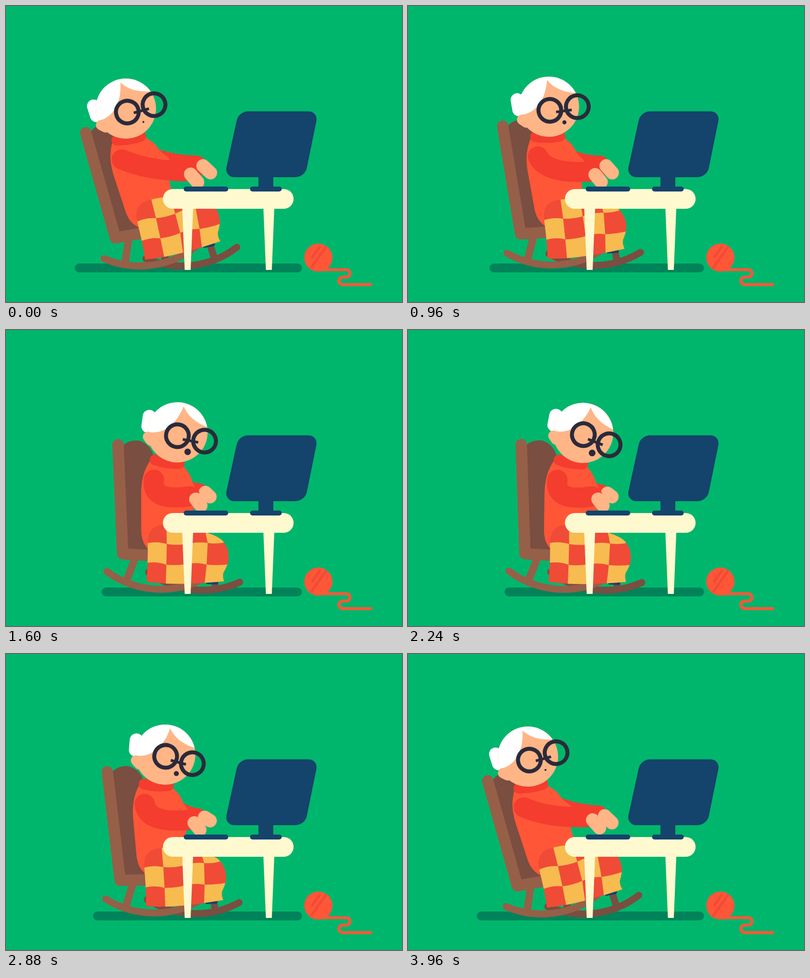
Animation, 800 px wide and 600 px high, one loop 4 s. Source, as an HTML page with a canvas:

```html
<!DOCTYPE html>
<html lang="en">
<head>
<meta charset="utf-8">
<title>Granny at the computer</title>
<style>
html, body { margin: 0; height: 100%; overflow: hidden; background: #00b66c; }
canvas { display: block; }
</style>
</head>
<body>
<canvas id="stage" width="800" height="600"></canvas>
<script>
const ctx = document.getElementById('stage').getContext('2d');
const LOOP = 4000, STEP = 40;
const color = {
  ground: '#00b66c', shadow: '#00835a', skin: '#ffb586', ink: '#2b2a3a',
  sweater: '#ff5638', sleeve: '#f43d2e', wood: '#965f48', darkWood: '#7a4e40',
  cream: '#fff9d0', navy: '#14436b', yellow: '#f7bb50', red: '#f04b37'
};

// Pivots in the leaning-back pose
const NEAR = [297.5, 525], FAR = [375, 525], HIP = [263, 477], NECK = [270, 266];

// Blanket grid, four lines of five knots
const GRID = [
  [[250, 400], [293, 390], [330, 380], [372, 385], [420, 385]],
  [[265, 437], [303, 430], [342, 421], [383, 409], [416, 400]],
  [[274, 476], [312, 471], [352, 460], [391, 452], [440, 439]],
  [[281, 516], [320, 511], [358, 503], [396, 491], [440, 478]]
];

// Cubic bezier (.6, 0, .4, 1), solved by bisection
function ease(x) {
  let lo = 0, hi = 1;
  for (let i = 0; i < 24; i++) {
    const s = (lo + hi) / 2, r = 1 - s;
    if (1.8 * s * r * r + 1.2 * s * s * r + s * s * s < x) lo = s; else hi = s;
  }
  return lo * lo * (3 - 2 * lo);
}
const ramp = (t, from, to) => ease(Math.min(1, Math.max(0, (t - from) / (to - from))));
const rock = t => ease(1 - Math.abs(((t + LOOP) % LOOP) / 2000 - 1));
const rad = deg => deg * Math.PI / 180;

function turn([x, y], [cx, cy], deg) {
  const c = Math.cos(rad(deg)), s = Math.sin(rad(deg));
  return [cx + (x - cx) * c - (y - cy) * s, cy + (x - cx) * s + (y - cy) * c];
}

function group(pivot, deg, draw) {
  ctx.save();
  ctx.translate(...pivot);
  ctx.rotate(rad(deg));
  ctx.translate(-pivot[0], -pivot[1]);
  draw();
  ctx.restore();
}

function fill(d, c) {
  ctx.fillStyle = c;
  ctx.fill(new Path2D(d));
}
function stroke(d, c, width, cap = 'round') {
  ctx.strokeStyle = c;
  ctx.lineWidth = width;
  ctx.lineCap = cap;
  ctx.lineJoin = 'round';
  ctx.stroke(new Path2D(d));
}
function disc(x, y, r, c) {
  ctx.fillStyle = c;
  ctx.beginPath();
  ctx.arc(x, y, r, 0, 7);
  ctx.fill();
}
const line = (a, b, c, width) => stroke(`M${a}L${b}`, c, width);
const curve = (a, mid, b, c, width) => stroke(`M${a}Q${mid} ${b}`, c, width);
const midpoint = (a, b, drop) => [(a[0] + b[0]) / 2, (a[1] + b[1]) / 2 + drop];

const rocker = (x, c) =>
  stroke(`M${x - 72.6} 512A183 183 0 0 0 ${x + 111.4} 489`, c, 14);

function farChair() {
  stroke('M326 480L320 518M410 476L421 512', color.darkWood, 14);
  rocker(355, color.darkWood);
}

function nearChair() {
  line([401, 486], [418, 483], color.navy, 8);
  fill('M170 258Q177 243 199 239Q227 240 238 268L290 445L225 462Z', color.darkWood);
  stroke('M161 257L221 470L300 456', color.wood, 23);
  stroke('M247.5 472L241 520', color.wood, 15);
  rocker(270.6, color.wood);
}

function torso() {
  fill('M216 272C209 295 209 315 218 345L240 412Q249 443 272 450L330 440L338 400' +
    'Q336 375 328 350L331 314Q330 306 318 300L310 292Q300 275 280 266Z', color.sweater);
  curve([224, 272], [250, 272], [272, 264], color.sleeve, 22);
}

function blanket() {
  ctx.save();
  ctx.clip(new Path2D('M265 437Q258 408 279 397Q300 388 340 386L376 389' +
    'Q405 391 414 400Q430 413 432 435Q432 447 428 459Q427 467 433 477' +
    'Q395 490 357 500Q320 510 281 514Q275 475 265 437Z'));
  fill('M240 370H450V530H240Z', color.red);
  for (let i = 0; i < 3; i++) {
    for (let j = 0; j < 4; j++) {
      if ((i + j) % 2 === 0) continue;
      const [a, b] = GRID[i].slice(j, j + 2), [d, c] = GRID[i + 1].slice(j, j + 2);
      const sag = j % 2 ? 3 : -5;
      fill(`M${a}Q${midpoint(a, b, sag)} ${b}L${c}Q${midpoint(c, d, sag)} ${d}Z`, color.yellow);
    }
  }
  ctx.restore();
}

function head(mouth, tilt) {
  line([177, 203], [183, 222], '#fff', 27);
  disc(242, 208, 61, color.skin);
  ctx.save();
  ctx.beginPath();
  ctx.arc(242, 208, 61, 0, 7);
  ctx.clip();
  fill('M231 155C233 190 222 222 190 232L170 236V130H310L300 172Q256 178 231 155Z', '#fff');
  ctx.restore();
  line([192, 241.5], [201, 246], color.skin, 21);
  disc(277.5, 235, mouth, color.ink);

  ctx.save();
  ctx.translate(272, 207.5);
  ctx.rotate(rad(tilt - 15.5));
  stroke('M-51 0a23 23 0 1 0 46 0a23 23 0 1 0 -46 0M5 0a23 23 0 1 0 46 0a23 23 0 1 0 -46 0', color.ink, 8);
  stroke('M-16 5H16', color.ink, 5.5, 'butt');
  ctx.restore();
}

function desk() {
  fill('M356 410H378L373 535H361ZM520 410H542L537 535H525Z', color.cream);
  line([337, 391], [561, 391], color.cream, 40);
  fill('M510 340H540V370H510Z', color.navy);
  line([364, 371], [444, 371], color.navy, 10);
  line([498, 371], [552, 371], color.navy, 10);
  ctx.fillStyle = color.navy;
  ctx.beginPath();
  ctx.moveTo(550, 213.5);
  ctx.arcTo(631, 213.5, 604, 347, 16);
  ctx.arcTo(604, 347, 441, 347, 24);
  ctx.arcTo(441, 347, 470, 213.5, 16);
  ctx.arcTo(470, 213.5, 550, 213.5, 24);
  ctx.fill();
}

function yarn() {
  stroke('M640 534.5H687.5a7.5 7.5 0 0 1 0 15H680a7.6 7.6 0 0 0 0 15.2H737', color.sweater, 6);
  disc(631, 510, 28.5, color.sweater);
  stroke('M634 488L619 509M646 489L617 530', color.red, 5);
}

function draw(t) {
  const p = rock(t);
  const lean = 14 * p;
  const bend = 5.2 * rock(t - 130);
  const look = ramp(t, 900, 2040) - ramp(t, 2760, 3960);
  const tilt = 8.5 * (ramp(t, 1280, 2200) - ramp(t, 3300, 3940));
  const tap = t < 3040 ? 0 : (1 - Math.cos((LOOP - t) / 192 * 2 * Math.PI)) / 2;
  const onTorso = point => turn(turn(point, HIP, bend), NEAR, lean);

  fill('M0 0H800V600H0Z', color.ground);
  line([148 + 57 * p, 531], [589, 531], color.shadow, 18);
  yarn();
  group(FAR, lean, farChair);
  group(NEAR, lean, nearChair);

  // Far arm
  const farKnuckle = [398 + 5 * p - 2 * tap, 324 + 7 * look + 11 * tap];
  const farTip = [413 - p - 3 * tap, 338 + 11 * tap];
  const farShoulder = onTorso([285, 305]);
  const cuff = [farKnuckle[0] - 14, farKnuckle[1] + 3 * look];
  curve(farShoulder, midpoint(farShoulder, cuff, 9), cuff, color.sleeve, 42);
  line(farKnuckle, farTip, color.skin, 27);

  group(NEAR, lean, () => {
    group(HIP, bend, () => {
      torso();
      group(NECK, 9.5 * look, () => head(2 + 4.8 * p, tilt));
    });
    blanket();
  });

  // Near arm
  const knuckle = [373 + 11 * p, 341 + 2 * p - 12.5 * tap];
  const tip = [387 + 7 * p, 357 - p - 12.5 * tap];
  const shoulder = onTorso([234, 311]);
  const fold = p * (1.5 - 0.5 * p);
  const elbow = [shoulder[0] + 50 - 58 * fold, shoulder[1] + 22 + 24 * fold];
  curve(shoulder, elbow, [knuckle[0] - 12, knuckle[1] - 6], color.sleeve, 41);
  line(knuckle, tip, color.skin, 27);

  desk();
}

function frame(now) {
  draw(Math.floor(now / STEP) * STEP % LOOP);
  requestAnimationFrame(frame);
}
draw(0);
requestAnimationFrame(frame);
</script>
</body>
</html>
```
